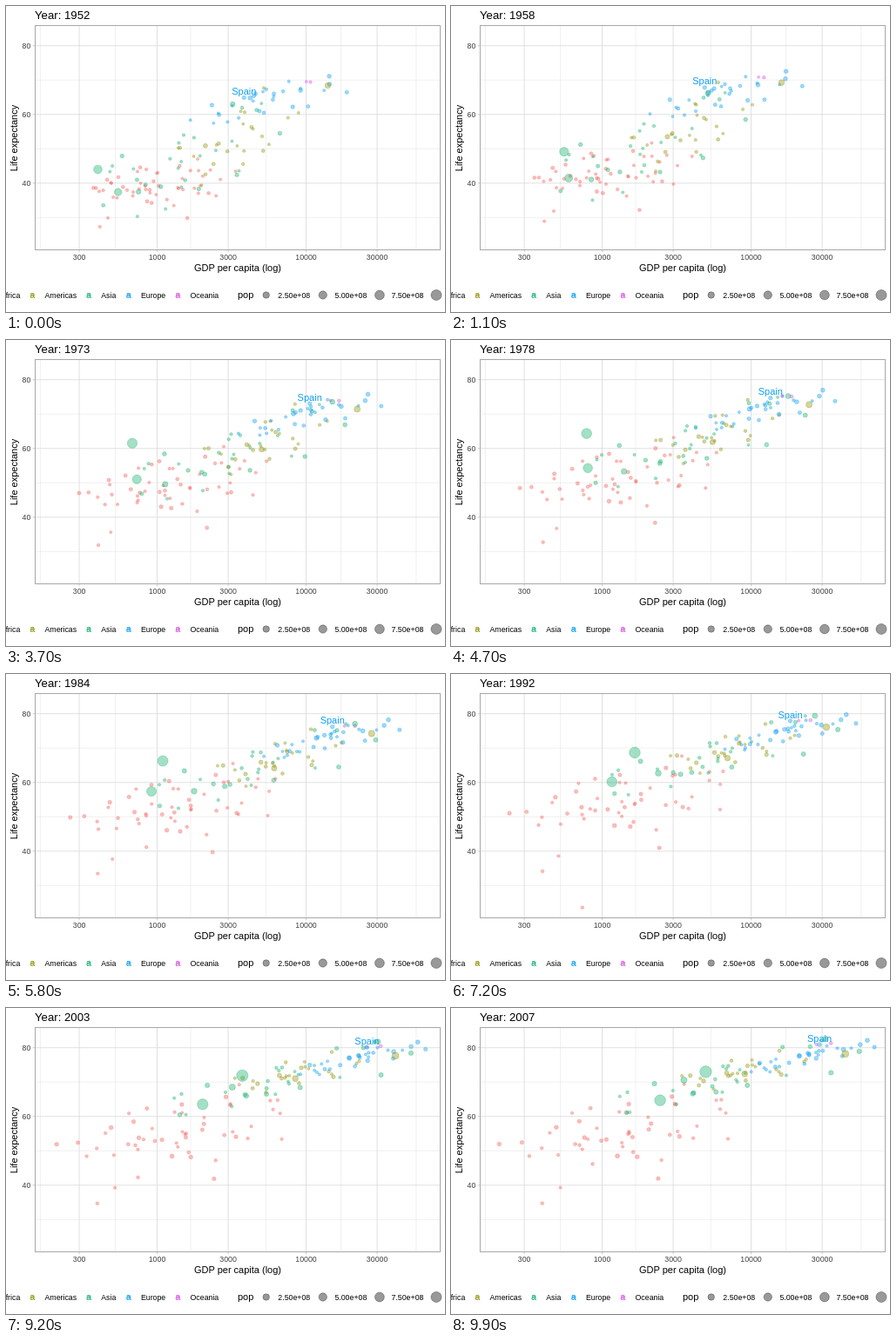
Animation of 504x352 px, one loop 10 s. Source, as an HTML page with a canvas:

```html
<!DOCTYPE html>
<html lang="en">
<head>
<meta charset="utf-8">
<title>Life expectancy and GDP</title>
<style>
  html, body { margin: 0; width: 100%; height: 100%; overflow: hidden; background: #fff; }
  canvas, svg { position: absolute; left: 0; top: 0; width: 504px; height: 352px; }
  text { font-family: "Liberation Sans", Arial, Helvetica, sans-serif; font-size: 11px; fill: #000; }
  .tick { font-size: 8.8px; fill: #404040; }
  .key { font-size: 8.8px; }
  .mid { text-anchor: middle; }
  .end { text-anchor: end; }
</style>
</head>
<body>
<canvas id="plot" width="504" height="352"></canvas>
<svg id="labels" viewBox="0 0 504 352"></svg>
<script>
const ctx = document.getElementById('plot').getContext('2d');
const svg = document.getElementById('labels');
const AFRICA = '#F35E5A', AMERICAS = '#939711', ASIA = '#18B16E', EUROPE = '#0F9FF0', OCEANIA = '#D94FE8';
const GRID = '#d9d9d9', EDGE = '#a8a8a8';
const BOX = { l: 33.5, t: 22.5, r: 498.5, b: 280.5 };
const FRAME = 100, FRAMES = 100;
const PER_STEP = 9, LAST = 11;   // nine pictures per five years, eleven such steps

const px = gdp => 173.5 + (Math.log10(gdp) - 3) * 171;
const py = life => 45.7 + (80 - life) * 3.953;
const radius = pop => 1.42 + 5.33 * Math.sqrt(Math.min(1, pop / 1318));
const mix = (a, b, k) => a + (b - a) * k;

let seed = 7;
function rnd() {
  seed = (seed * 1664525 + 1013904223) % 4294967296;
  return seed / 4294967296;
}

// Each dot gives its place and population (millions) at step u
const dots = [];

// A single country moving straight between key points [step, GDP, life expectancy]
function track(color, pop0, pop1, keys) {
  const pts = keys.map(([u, gdp, life]) => [u, px(gdp), py(life)]);
  const at = u => {
    const i = Math.max(1, pts.findIndex(p => p[0] >= u));
    const [u0, x0, y0] = pts[i - 1], [u1, x1, y1] = pts[i];
    const k = (u - u0) / (u1 - u0);
    return { x: mix(x0, x1, k), y: mix(y0, y1, k), pop: mix(pop0, pop1, u / LAST) };
  };
  dots.push({ color, at });
  return at;
}

// The rest of a continent: [first, last] log GDP, life expectancy, their spreads and correlation;
// growth slows down with the power ease
function crowd(color, n, { lg, lgSd, life, lifeSd, rho, ease, pop, growth }) {
  for (let i = 0; i < n; i++) {
    const q = (2 * i + 1) / n - 1;
    const z = q * (1.2 + 0.8 * q * q);                 // wealth rank
    const e = (rnd() + rnd() + rnd() - 1.5) * 2;       // health apart from wealth
    const drift = [rnd() - 0.5, rnd() - 0.5];
    const pop0 = 1 + pop * rnd() ** 3;
    const at = u => {
      const t = u / LAST, k = 1 - (1 - t) ** ease, r = mix(...rho, k);
      const gdp = 10 ** (mix(...lg, k) + mix(...lgSd, k) * (z + 0.7 * mix(...drift, t)));
      const years = mix(...life, k) + mix(...lifeSd, k) * (r * z + Math.sqrt(1 - r * r) * e);
      return { x: px(gdp), y: py(years), pop: pop0 * mix(1, growth, t) };
    };
    dots.push({ color, at });
  }
}

crowd(AFRICA, 51, { lg: [2.98, 3.14], lgSd: [.25, .37], life: [39.5, 56], lifeSd: [4.8, 8],
  rho: [.35, .5], ease: 2, pop: 16, growth: 3 });
crowd(ASIA, 28, { lg: [3.16, 3.83], lgSd: [.32, .41], life: [47.5, 71.5], lifeSd: [8, 5.2],
  rho: [.6, .85], ease: 1.45, pop: 40, growth: 2.3 });
crowd(AMERICAS, 23, { lg: [3.53, 3.92], lgSd: [.21, .23], life: [54, 73.7], lifeSd: [7.5, 3],
  rho: [.6, .65], ease: 1.3, pop: 24, growth: 2.4 });
crowd(EUROPE, 29, { lg: [3.75, 4.38], lgSd: [.25, .22], life: [64.8, 77.7], lifeSd: [4.2, 2.7],
  rho: [.75, .88], ease: 1.15, pop: 60, growth: 1.2 });
crowd(OCEANIA, 2, { lg: [4.01, 4.47], lgSd: [.02, .08], life: [69.2, 80.7], lifeSd: [.2, .6],
  rho: [.5, .9], ease: 1, pop: 8, growth: 2 });

track(ASIA, 556, 1318, [[0, 400, 44], [1, 576, 50.5], [2, 488, 44.5], [3, 613, 58.4],
  [5, 741, 64], [8, 1656, 68.7], [11, 4959, 73]]);
track(ASIA, 372, 1110, [[0, 547, 37.4], [4, 724, 50.7], [6, 856, 56.6], [8, 1164, 60.2], [11, 2452, 64.7]]);
track(ASIA, 82, 223, [[0, 750, 37.5], [4, 1111, 49.2], [8, 2383, 62.7], [11, 3541, 70.6]]);
track(ASIA, 86, 127, [[0, 3217, 63], [4, 14779, 73.4], [8, 26825, 79.4], [11, 31656, 82.6]]);
track(AMERICAS, 158, 301, [[0, 13990, 68.4], [4, 21806, 71.3], [8, 32004, 76.1], [11, 42952, 78.2]]);
track(AMERICAS, 57, 190, [[0, 2109, 50.9], [4, 4986, 59.5], [8, 6950, 67.1], [11, 9066, 72.4]]);
track(AFRICA, 3, 9, [[0, 493, 40], [6, 882, 46.2], [8, 737, 23.6], [9, 590, 36.1], [11, 863, 46.2]]);
const spain = track(EUROPE, 28, 40, [[0, 3834, 64.9], [2, 5694, 69.7], [3, 7994, 71.4],
  [5, 13237, 74.4], [7, 15765, 76.9], [11, 28821, 80.9]]);

function label(str, x, y, cls = '') {
  const el = document.createElementNS('http://www.w3.org/2000/svg', 'text');
  el.textContent = str;
  el.setAttribute('x', x);
  el.setAttribute('y', y);
  el.setAttribute('class', cls);
  svg.appendChild(el);
  return el;
}

const TICKS_X = [300, 1000, 3000, 10000, 30000], TICKS_Y = [40, 60, 80];
const KEYS = [['Americas', AMERICAS, 30.3], ['Asia', ASIA, 95],
  ['Europe', EUROPE, 140.7], ['Oceania', OCEANIA, 197.3]];
const SIZES = [[250, '2.50e+08'], [500, '5.00e+08'], [750, '7.50e+08'], [1000, '']];
const sizeX = i => 298.7 + i * 65.1;

for (const g of TICKS_X) label(g, px(g), 292, 'tick mid');
for (const l of TICKS_Y) label(l, 28.3, py(l) + 3.2, 'tick end');
label('GDP per capita (log)', 266, 305, 'mid');
label('Life expectancy', 0, 0, 'mid').setAttribute('transform', 'translate(13.3 152) rotate(-90)');
label('Africa', -6.2, 335.5, 'key');
for (const [str, color, x] of KEYS) {
  label('a', x, 336, 'mid').style.fill = color;
  label(str, x + 14.2, 335.5, 'key');
}
label('pop', 266, 336.3);
SIZES.forEach(([, str], i) => label(str, sizeX(i) + 13.6, 335.5, 'key'));
const title = label('', 33, 15);
title.style.fontSize = '13.2px';
const name = label('Spain', 0, 0, 'mid');
name.style.fill = EUROPE;

function line(x1, y1, x2, y2, color, w) {
  ctx.strokeStyle = color;
  ctx.lineWidth = w;
  ctx.beginPath();
  ctx.moveTo(x1, y1);
  ctx.lineTo(x2, y2);
  ctx.stroke();
}

function dot(x, y, r, color) {
  ctx.globalAlpha = 0.4;
  ctx.fillStyle = ctx.strokeStyle = color;
  ctx.lineWidth = 0.75;
  ctx.beginPath();
  ctx.arc(x, y, r, 0, 7);
  ctx.fill();
  ctx.stroke();
  ctx.globalAlpha = 1;
}

function grid() {
  const col = (x, w) => line(x, BOX.t, x, BOX.b, GRID, w);
  const row = (y, w) => line(BOX.l, y, BOX.r, y, GRID, w);
  for (let i = 0; i < 6; i++) col(39.4 + i * 86.3, 0.4);
  for (const l of [30, 50, 70]) row(py(l), 0.4);
  for (const g of TICKS_X) {
    col(px(g), 0.8);
    line(px(g), BOX.b, px(g), BOX.b + 2.75, EDGE, 0.6);
  }
  for (const l of TICKS_Y) {
    row(py(l), 0.8);
    line(BOX.l - 2.75, py(l), BOX.l, py(l), EDGE, 0.6);
  }
}

function draw(frame) {
  const u = frame / PER_STEP;
  ctx.fillStyle = '#fff';
  ctx.fillRect(0, 0, 504, 352);
  grid();
  for (const d of dots) {
    const { x, y, pop } = d.at(u);
    dot(x, y, radius(pop), d.color);
  }
  ctx.strokeStyle = EDGE;
  ctx.lineWidth = 1;
  ctx.strokeRect(BOX.l, BOX.t, BOX.r - BOX.l, BOX.b - BOX.t);
  for (const [, color, x] of KEYS) dot(x, 332.5, 1.95, color);
  SIZES.forEach(([pop], i) => dot(sizeX(i), 332.5, radius(pop), '#000'));
  title.textContent = 'Year: ' + Math.round(1952 + u * 5);
  const at = spain(u);
  name.setAttribute('x', at.x);
  name.setAttribute('y', at.y - 3.3);
}

let shown = -1;
const start = performance.now();
function tick() {
  const frame = Math.floor((performance.now() - start) / FRAME) % FRAMES;
  if (frame !== shown) draw(shown = frame);
  requestAnimationFrame(tick);
}
tick();
</script>
</body>
</html>
```
